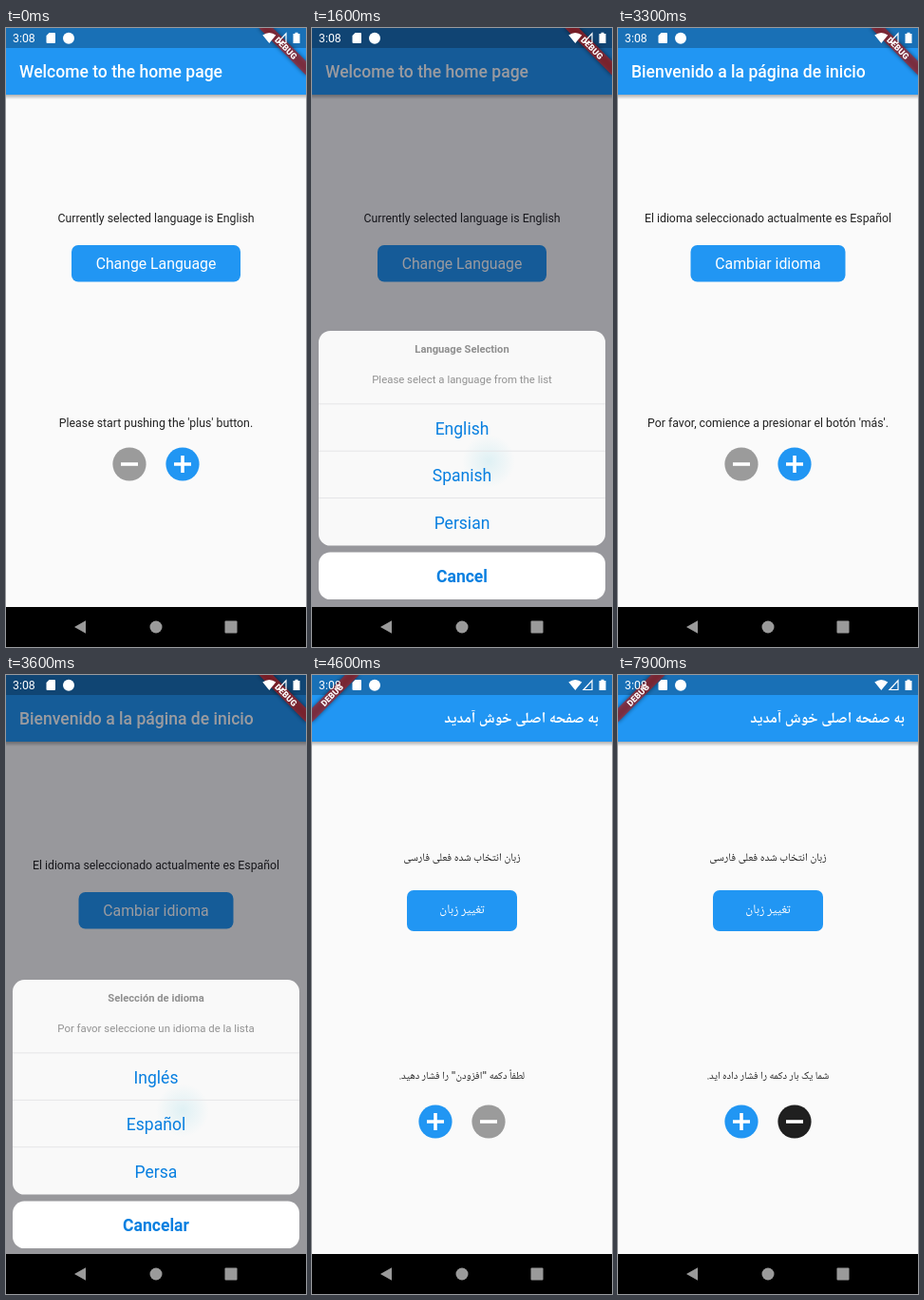
Animation of 316 by 650 pixels, one loop 8 s. Source, as an HTML page:

```html
<!DOCTYPE html>
<html lang="en">
<head>
<meta charset="utf-8">
<style>
html, body { margin: 0; height: 100%; overflow: hidden; background: #000; }
svg { display: block; width: 100%; height: 100%; font: 12.3px Roboto, sans-serif; }
.rtl { font-family: "Noto Naskh Arabic UI", "Noto Naskh Arabic", "Noto Sans Arabic", "DejaVu Sans", sans-serif; }
.mid { text-anchor: middle; }
</style>
</head>
<body>
<svg id="stage" viewBox="0 0 316 650"></svg>
<script>
const BLUE = '#2196f3';
const langs = [
  {
    title: 'Welcome to the home page', current: 'Currently selected language is English',
    change: 'Change Language', width: 178, push: "Please start pushing the 'plus' button.",
    sheet: ['Language Selection', 'Please select a language from the list', 'English', 'Spanish', 'Persian', 'Cancel']
  },
  {
    title: 'Bienvenido a la página de inicio', current: 'El idioma seleccionado actualmente es Español',
    change: 'Cambiar idioma', width: 163, push: "Por favor, comience a presionar el botón 'más'.",
    sheet: ['Selección de idioma', 'Por favor seleccione un idioma de la lista', 'Inglés', 'Español', 'Persa', 'Cancelar']
  },
  {
    rtl: true, title: 'به صفحه اصلی خوش آمدید', current: 'زبان انتخاب شده فعلی فارسی',
    change: 'تغییر زبان', width: 116, push: 'لطفاً دکمه "افزودن" را فشار دهید.',
    pushed: 'شما یک بار دکمه را فشار داده اید.'
  }
];

const text = (s, x, y, size, fill, attrs = '') =>
  `<text x="${x}" y="${y}" font-size="${size}" fill="${fill}" ${attrs}>${s}</text>`;
const mid = (s, y, size, fill, attrs = '') => text(s, 158, y, size, fill, `class="mid" ${attrs}`);

const round = (x, y, sign, fill, id = '') =>
  `<g transform="translate(${x} ${y})"><circle ${id} r="17.6" fill="${fill}"/>
   <path d="M-9 0H9${sign === '+' ? 'M0 -9V9' : ''}" stroke="#fff" stroke-width="3.6"/></g>`;

function home(l, i) {
  const r = l.rtl, w = l.width, ink = '#212121';
  const title = r
    ? text(l.title, 302, 49.5, 15.9, '#fff', 'direction="rtl" font-weight="700"')
    : text(l.title, 14, 52.3, 17.55, '#fff', 'font-weight="500"');
  const dir = r ? 'direction="rtl"' : '';
  return `<g id="home${i}" class="${r ? 'rtl' : ''}">${title}
    ${mid(l.current, r ? 195 : 203.5, r ? 11.6 : 12.3, ink, dir)}
    <rect x="${158 - w / 2}" y="${r ? 226 : 228}" width="${w}" height="${r ? 43 : 38.5}" rx="7" fill="${BLUE}"/>
    ${mid(l.change, r ? 250 : 253, r ? 13.4 : 15.8, '#fff', dir)}
    ${mid(l.push, r ? 423.5 : 418.5, r ? 11 : 12.3, ink, dir + ` id="push${i}"`)}
    ${round(r ? 186 : 130, r ? 469 : 458, '-', '#9b9b9b', `id="minus${i}"`)}
    ${round(r ? 130 : 186, r ? 469 : 458, '+', BLUE)}</g>`;
}

function sheet(l, i) {
  const [title, hint, ...rows] = l.sheet, cancel = rows.pop(), link = '#087fe0';
  return `<g id="sheet${i}">
    <rect x="7" y="318" width="302" height="225.5" rx="12.3" fill="#f9f9f9"/>
    <circle cx="186" cy="455" r="28" fill="url(#glow)"/>
    <rect x="7" y="550.5" width="302" height="49.5" rx="12.3" fill="#fff"/>
    ${mid(title, 340.5, 11.2, '#8f8f8f', 'font-weight="600"')}
    ${mid(hint, 373, 11.4, '#929292')}
    ${rows.map((s, k) => `<path d="M7 ${394.8 + 49.4 * k}h302" stroke="#e5e5e7"/>` +
      mid(s, 426.8 + 49.4 * k, 17.55, link)).join('')}
    ${mid(cancel, 581.8, 17.55, link, 'font-weight="600"')}</g>`;
}

document.getElementById('stage').innerHTML = `
  <defs>
    <radialGradient id="glow"><stop stop-color="#bfe6ee" stop-opacity=".45"/><stop offset="1" stop-color="#bfe6ee" stop-opacity="0"/></radialGradient>
    <linearGradient id="shade" x2="0" y2="1"><stop stop-opacity=".3"/><stop offset="1" stop-opacity="0"/></linearGradient>
    <filter id="blur" x="-20%" y="-80%" width="140%" height="260%"><feGaussianBlur stdDeviation="2.3"/></filter>
  </defs>
  <rect width="316" height="608" fill="#fafafa"/>
  <rect y="70" width="316" height="5" fill="url(#shade)"/>
  <rect width="316" height="70" fill="${BLUE}"/>
  <rect width="316" height="21" fill="#1970b6"/>
  ${langs.map(home).join('')}
  <rect id="dim" width="316" height="608" fill="#04040f"/>
  <g id="popup">${langs.slice(0, 2).map(sheet).join('')}</g>
  <g id="banner">
    <rect x="-35" y="24.6" width="70" height="10.5" opacity=".5" filter="url(#blur)"/>
    <rect x="-35" y="24.6" width="70" height="10.5" fill="#b71c1c" fill-opacity=".63"/>
    ${text('DEBUG', 0, 33, 8.95, '#fff', 'class="mid" font-weight="900"')}
  </g>
  <g fill="#fff">
    ${text('3:08', 7, 15.3, 12.3, '#fff')}
    <path d="M45.5 5H51q1 0 1 1v9q0 1-1 1h-7.500q-1 0-1-1V8z"/>
    <circle cx="66" cy="10.700" r="6"/>
    <path d="M277.300 16L270.300 7.500Q277.300 2.500 284.300 7.500Z"/>
    <path d="M295 5.800V15.500H286Z" fill="none" stroke="#fff" stroke-width="1.200"/>
    <path d="M302.500 6h2v-1.200h3V6h2v10h-7z"/>
  </g>
  <rect y="608" width="316" height="42"/>
  <g fill="#9a9a9a">
    <path d="M72 629L84 622.300V635.700Z"/><circle cx="158" cy="629" r="6.500"/>
    <rect x="230.500" y="622.500" width="13" height="13" rx="1"/>
  </g>`;

function bezier(x1, y1, x2, y2) {
  const at = (a, b, s) => 3 * a * s * (1 - s) ** 2 + 3 * b * s * s * (1 - s) + s ** 3;
  return x => {
    if (x <= 0 || x >= 1) return x <= 0 ? 0 : 1;
    let lo = 0, hi = 1;
    for (let i = 0; i < 24; i++) {
      const s = (lo + hi) / 2;
      if (at(x1, x2, s) < x) lo = s; else hi = s;
    }
    return at(y1, y2, lo);
  };
}
const slide = bezier(.35, .91, .33, .97), ease = bezier(.25, .1, .25, 1);
const popups = [{ open: 1240, close: 1992 }, { open: 3310, close: 4110 }];
const SPEED = 335, PRESS = 6500, LOOP = 8000;

const $ = id => document.getElementById(id);
const show = (id, on) => $(id).setAttribute('display', on ? 'inline' : 'none');

function draw(now) {
  const t = now % LOOP;
  const lang = popups.filter(p => t >= p.close + 40).length;
  langs.forEach((l, i) => show('home' + i, i === lang));

  const n = t < 2700 ? 0 : 1, p = popups[n];
  const opened = (t - p.open) / SPEED, closed = (t - p.close) / SPEED;
  const up = slide(opened) - slide(closed);
  show('sheet0', n === 0);
  show('sheet1', n === 1);
  show('popup', up > 0);
  $('popup').setAttribute('transform', `translate(0 ${297 * (1 - up)})`);
  $('dim').setAttribute('opacity', .4 * ease(closed > 0 ? 1 - closed : opened));

  $('banner').setAttribute('transform', lang === 2 ? 'rotate(-45)' : 'translate(316 0) rotate(45)');
  const pressed = t >= PRESS;
  $('push2').textContent = pressed ? langs[2].pushed : langs[2].push;
  $('minus2').setAttribute('fill', pressed ? '#1f1f1f' : '#9b9b9b');
}
function frame() {
  draw(performance.now());
  requestAnimationFrame(frame);
}
frame();
</script>
</body>
</html>
```
